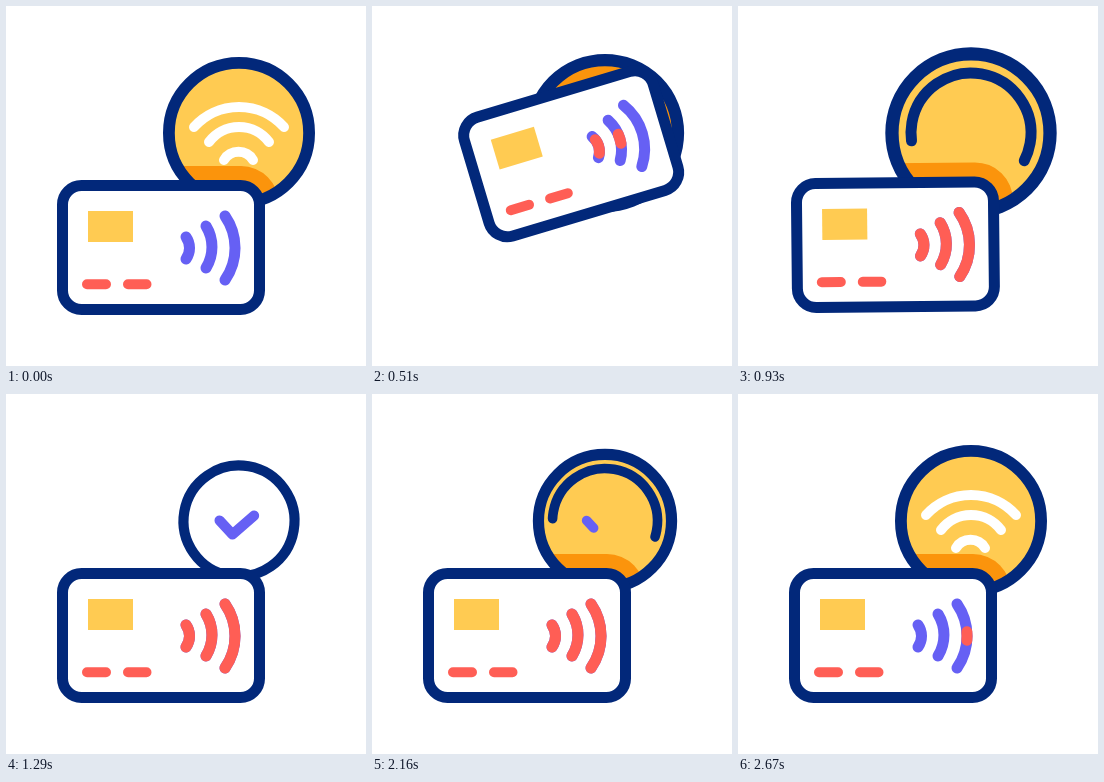
Recreate the animation shown at these times as an HTML page. Size 360 by 360 pixels, loop 2.7 s.

```html
<!DOCTYPE html>
<html lang="en">
<head>
<meta charset="utf-8">
<title>Contactless payment</title>
<style>
  html, body { margin: 0; width: 100%; height: 100%; overflow: hidden; background: #fff; }
  svg { display: block; width: 100vw; height: 100vh; }
  .line { fill: none; stroke-linecap: round; stroke-linejoin: round; stroke-width: 11; }
  .navy { stroke: #02287a; }
  .violet { stroke: #6660f4; }
  .red { stroke: #ff5e55; }
  .white { stroke: #fff; stroke-width: 10; }
</style>
</head>
<body>
<svg viewBox="0 0 360 360">
  <clipPath id="coinClip"><circle id="clipDisc" cx="233" cy="127" r="71"/></clipPath>
  <g id="coin">
    <circle cx="233" cy="127" r="71" fill="#ffcb52"/>
  </g>
  <g clip-path="url(#coinClip)">
    <rect id="shade" x="37" y="160" width="236" height="163" rx="38" fill="#fb940c"/>
  </g>
  <g id="rim">
    <g id="wifi" class="line white">
      <path pathLength="1" d="M218 154A17 17 0 0 1 247 154"/>
      <path pathLength="1" d="M203 136A37.5 37.5 0 0 1 263 136"/>
      <path pathLength="1" d="M188 121A60.6 60.6 0 0 1 278 121"/>
    </g>
    <circle class="navy" cx="233" cy="127" r="70.1" fill="none" stroke-width="11.8"/>
  </g>
  <g id="badge">
    <circle id="ring" class="line navy" pathLength="1" cx="233" cy="127" r="60" transform="rotate(100 233 127)"/>
    <path id="check" class="line violet" pathLength="1" d="M212 126.5L226 141.5L253.5 117.5"/>
  </g>
  <g id="card">
    <rect class="navy" x="56.5" y="179.5" width="197" height="124" rx="19" fill="#fff" stroke-width="11"/>
    <rect x="82" y="205" width="45" height="31" fill="#ffcb52"/>
    <path id="dashes" class="line" style="stroke-width:10" d="M81 278.3H100M122 278.3H140.5"/>
    <g id="waves"></g>
  </g>
</svg>
<script>
const LOOP = 2700;
const $ = id => document.getElementById(id);

// Smooth keyframes that never overshoot: flat at extremes, harmonic slope elsewhere.
function track(keys) {
  const n = keys.length;
  const slope = i => (keys[i + 1][1] - keys[i][1]) / (keys[i + 1][0] - keys[i][0]);
  const tangent = i => {
    if (i === 0 || i === n - 1) return 0;
    const a = slope(i - 1), b = slope(i);
    return a * b <= 0 ? 0 : 2 * a * b / (a + b);
  };
  return t => {
    if (t <= keys[0][0]) return keys[0][1];
    if (t >= keys[n - 1][0]) return keys[n - 1][1];
    let i = 0;
    while (t > keys[i + 1][0]) i++;
    const [t0, v0] = keys[i], [t1, v1] = keys[i + 1];
    const d = t1 - t0, s = (t - t0) / d, q = 1 - s;
    return v0 * (1 + 2 * s) * q * q + v1 * s * s * (3 - 2 * s)
      + d * s * q * (tangent(i) * q - tangent(i + 1) * s);
  };
}

const ramp = (t, a, b) => Math.min(1, Math.max(0, (t - a) / (b - a)));

function trim(el, from, to) {
  const len = to - from;
  el.style.display = len > 0.002 ? '' : 'none';
  el.style.strokeDasharray = len > 0.999 ? 'none' : `${len} 2`;
  el.style.strokeDashoffset = -from;
}
const trimMiddle = (el, len) => trim(el, 0.5 - len / 2, 0.5 + len / 2);

const scaleCoin = s => `translate(233 127) scale(${s}) translate(-233 -127)`;

const cardX = track([[0, 0], [270, 38], [390, 47], [720, 31.5], [980, 0]]);
const cardY = track([[0, 0], [270, -86.5], [390, -108], [720, -44.5], [980, 0]]);
const cardTurn = track([[0, 0], [270, -15], [390, -18.7], [720, -9], [980, 0]]);
const coinRadius = track([
  [0, 76], [450, 76], [540, 81], [720, 89], [790, 90], [1000, 82], [1110, 72],
  [1200, 46], [1270, 0], [1970, 0], [2060, 36], [2160, 72], [2340, 90], [2600, 76]
]);
const ringScale = track([[1110, 1], [1290, 0.925], [1350, 0.915], [1600, 1], [1970, 1], [2160, 0.875], [2300, 0.8]]);
const ringLen = track([[690, 0], [720, 0.016], [900, 0.5], [1080, 1], [2010, 1], [2160, 0.546], [2300, 0]]);
const checkLen = track([[1090, 0], [1290, 0.9], [1350, 1], [1980, 1], [2160, 0.21], [2200, 0]]);

// Each wave is violet with a red copy that spreads from its middle.
const waves = [
  { d: 'M180 231A19 19 0 0 1 180 253', on: [400, 580], off: [2300, 2520] },
  { d: 'M200 220A40 40 0 0 1 200 262', on: [470, 660], off: [2380, 2610] },
  { d: 'M219 210A56 56 0 0 1 219 274', on: [560, 740], off: [2470, 2700] }
];
for (const w of waves) {
  for (const tone of ['violet', 'red']) {
    const p = document.createElementNS('http://www.w3.org/2000/svg', 'path');
    p.setAttribute('class', 'line ' + tone);
    p.setAttribute('pathLength', 1);
    p.setAttribute('d', w.d);
    $('waves').append(p);
    w.top = p;
  }
}
const wifi = [...$('wifi').children];

function draw(t) {
  const move = `translate(${cardX(t)} ${cardY(t)}) rotate(${cardTurn(t)} 155 241.5)`;
  $('card').setAttribute('transform', move);
  $('shade').setAttribute('transform', move);
  $('dashes').style.stroke = t >= 150 && t < 390 ? '#d78c42' : '#ff5e55';

  const size = coinRadius(t) / 76;
  for (const id of ['coin', 'rim']) {
    $(id).setAttribute('transform', scaleCoin(size));
    $(id).style.display = size > 0 ? '' : 'none';
  }
  $('clipDisc').setAttribute('r', 71 * size);

  $('badge').setAttribute('transform', scaleCoin(ringScale(t)));
  trimMiddle($('ring'), ringLen(t));
  trim($('check'), 0, checkLen(t));

  wifi.forEach((el, i) => {
    const gone = ramp(t, 400 + i * 40, 520 + i * 40);
    const back = ramp(t, 2270 + i * 70, 2460 + i * 80);
    trimMiddle(el, 1 - gone + back);
  });
  for (const w of waves) trimMiddle(w.top, ramp(t, ...w.on) - ramp(t, ...w.off));
}

const start = performance.now();
function tick(now) {
  draw(Math.max(0, now - start) % LOOP);
  requestAnimationFrame(tick);
}
draw(0);
requestAnimationFrame(tick);
</script>
</body>
</html>
```
